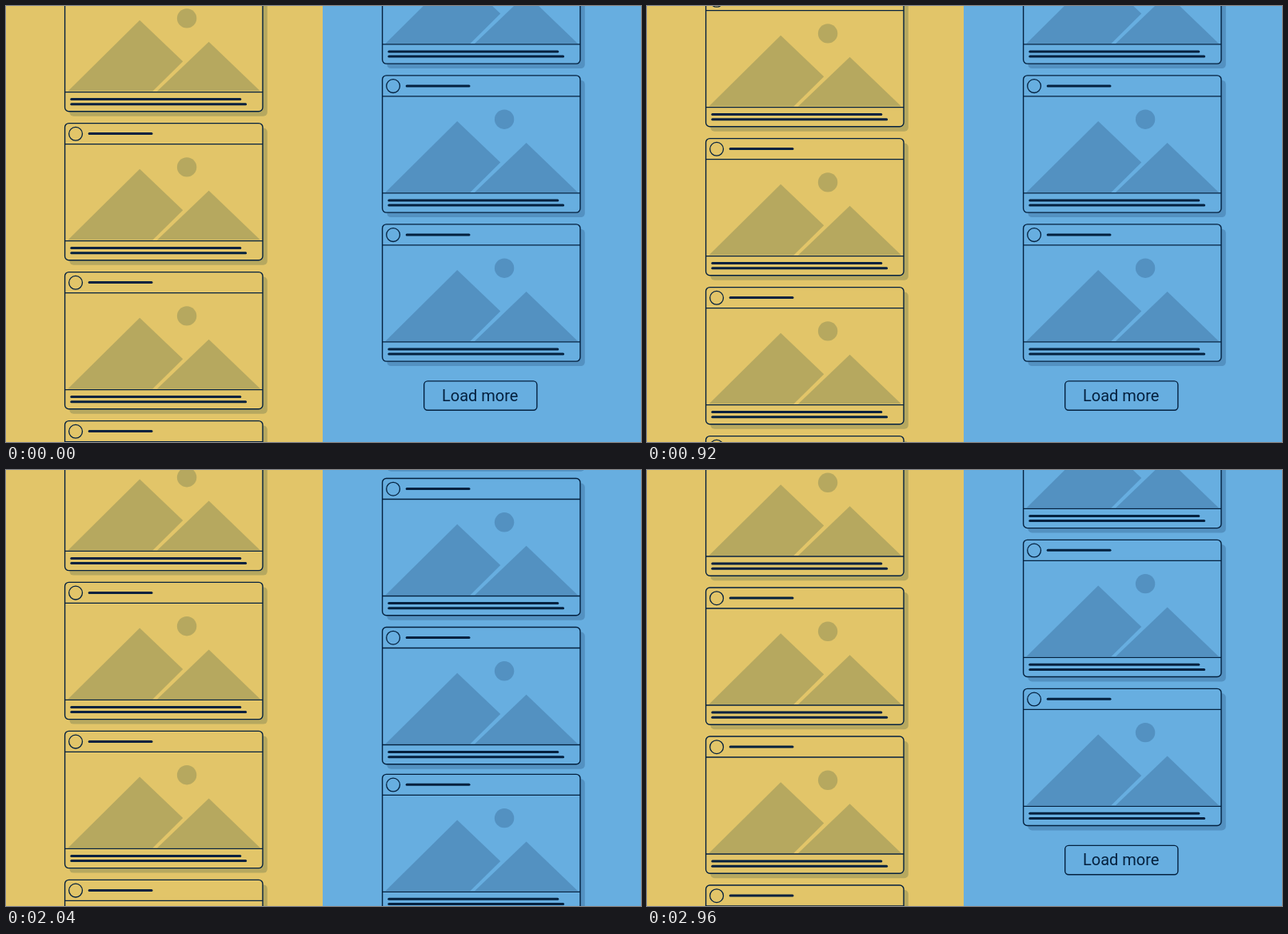
Animation, 794 px wide and 545 px high, one loop 3000 ms. Source, as an HTML page with a canvas:

```html
<!DOCTYPE html>
<html lang="en">
<head>
<meta charset="utf-8">
<title>Infinite scroll and load more</title>
<style>
  html, body { margin: 0; width: 100%; height: 100%; overflow: hidden; background: #67aee0; }
  canvas { display: block; }
</style>
</head>
<body>
<canvas id="stage" width="794" height="545"></canvas>
<script>
const ctx = document.getElementById('stage').getContext('2d');
const LOOP = 3000, STEP = 40;
const SPLIT = 396, PITCH = 186;
const CARD = { w: 247.4, h: 171.2, r: 5 };
const BUTTON = { x: 522.7, w: 141.2, h: 36.4, gap: 196 };
const LEFT = { x: 73.6, bg: '#e2c569', shade: '#b6a85f' };
const RIGHT = { x: 470.6, bg: '#67aee0', shade: '#5391c1' };
const INK = '#04213f';
const LEFT_TOP = 146.6, LAST_TOP = 272.9;

const clamp = v => Math.min(1, Math.max(0, v));
const span = (t, from, to) => clamp((t - from) / (to - from));
const smooth = p => p * p * (3 - 2 * p);
const mix = (a, b, p) => a + (b - a) * p;

// Ease with horizontal handles of reach a and 1 - b
function ease(p, a, b) {
  if (p <= 0 || p >= 1) return clamp(p);
  let lo = 0, hi = 1;
  for (let i = 0; i < 30; i++) {
    const s = (lo + hi) / 2, q = 1 - s;
    if (3 * a * s * q * q + 3 * b * s * s * q + s * s * s < p) lo = s; else hi = s;
  }
  return smooth(lo);
}

function box(x, y, w, h, r) {
  ctx.beginPath();
  ctx.roundRect(x, y, w, h, r);
}

function shape(points) {
  ctx.beginPath();
  points.forEach(([x, y]) => ctx.lineTo(x, y));
  ctx.fill();
}

function dot(x, y, r) {
  ctx.beginPath();
  ctx.arc(x, y, r, 0, Math.PI * 2);
}

function line(x1, x2, y, width, cap) {
  ctx.lineWidth = width;
  ctx.lineCap = cap;
  ctx.beginPath();
  ctx.moveTo(x1, y);
  ctx.lineTo(x2, y);
  ctx.stroke();
}

function details(theme) {
  ctx.fillStyle = theme.shade;
  dot(152.5, 54.8, 12.2);
  ctx.fill();
  shape([[3.8, 146], [93.6, 57.2], [147.6, 108.6], [109.8, 146]]);
  shape([[115.4, 146], [180, 84.2], [244.4, 146]]);

  ctx.strokeStyle = INK;
  line(0, CARD.w, 26, 1.3, 'butt');
  line(0, CARD.w, 147, 1.3, 'butt');
  dot(13.5, 13.2, 8.4);
  ctx.stroke();
  line(30.6, 108.4, 13, 3, 'round');
  line(8.2, 219.2, 156, 3, 'round');
  line(8.2, 226, 162.2, 3, 'round');
}

function card(theme, top, alpha = 1) {
  if (top > 550 || top < -185) return;
  ctx.save();
  ctx.translate(theme.x, top);
  ctx.globalAlpha = alpha;
  ctx.fillStyle = theme.shade;
  box(5.8, 6, CARD.w, CARD.h, CARD.r);
  ctx.fill();
  ctx.globalAlpha = 1;
  ctx.fillStyle = theme.bg;
  box(0, 0, CARD.w, CARD.h, CARD.r);
  ctx.fill();
  ctx.globalAlpha = alpha;
  details(theme);
  ctx.globalAlpha = 1;
  ctx.lineWidth = 1.4;
  box(0, 0, CARD.w, CARD.h, CARD.r);
  ctx.stroke();
  ctx.restore();
}

// Button that grows into an empty card as p goes from 0 to 1
function button(top, p = 0) {
  ctx.strokeStyle = INK;
  ctx.lineWidth = 1.4;
  box(mix(BUTTON.x, RIGHT.x, p), top, mix(BUTTON.w, CARD.w, p), mix(BUTTON.h, CARD.h, p), 4.5);
  ctx.stroke();
  ctx.globalAlpha = clamp(1 - 2 * p);
  ctx.fillStyle = INK;
  ctx.font = '20px Roboto, Arial, sans-serif';
  ctx.textAlign = 'center';
  ctx.fillText('Load more', 592.7, top + 24.6);
  ctx.globalAlpha = 1;
}

function half(theme, x, w, draw) {
  ctx.save();
  ctx.beginPath();
  ctx.rect(x, 0, w, 545);
  ctx.clip();
  ctx.fillStyle = theme.bg;
  ctx.fillRect(x, 0, w, 545);
  draw();
  ctx.restore();
}

function endless(t) {
  const scroll = 4 * PITCH * smooth(t / LOOP);
  for (let i = -1; i < 7; i++) card(LEFT, LEFT_TOP + i * PITCH - scroll);
}

function loadMore(t) {
  const last = LAST_TOP - 2 * PITCH * ease(span(t, 1490, LOOP), 0.54, 0.567);
  for (let i = 2; i >= 0; i--) card(RIGHT, last - i * PITCH);

  const from = LAST_TOP + BUTTON.gap, to = LAST_TOP - PITCH;
  const next = mix(from, to, ease(span(t, 1360, LOOP), 0.598, 0.592));
  if (t < 1120) {
    button(next, smooth(span(t, 940, 1120)));
  } else {
    card(RIGHT, next, span(t, 1120, 1320));
    card(RIGHT, next + PITCH);
    button(next + PITCH + BUTTON.gap);
  }
}

function frame(now) {
  const t = Math.floor((now % LOOP) / STEP) * STEP;
  half(LEFT, 0, SPLIT, () => endless(t));
  half(RIGHT, SPLIT, 794 - SPLIT, () => loadMore(t));
}

let start;
function tick(now) {
  start ??= now;
  frame(Math.max(0, now - start));
  requestAnimationFrame(tick);
}
frame(0);
requestAnimationFrame(tick);
</script>
</body>
</html>
```
